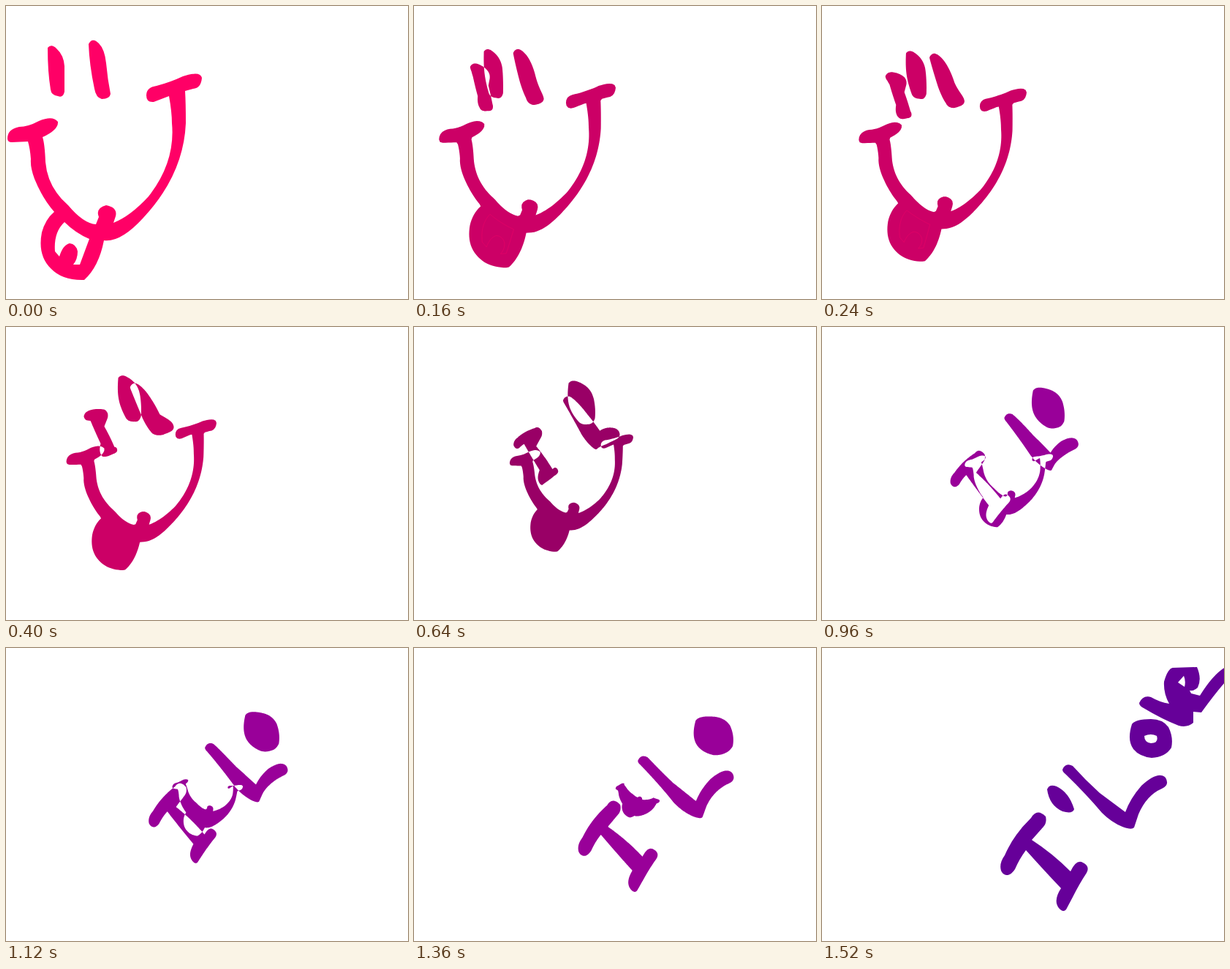
An HTML page that plays this animation: 550x400 px, repeating every 1.68 s.

```html
<!DOCTYPE html>
<html lang="en">
<head>
<meta charset="utf-8">
<title>Smile into letters</title>
<style>
  html, body { margin: 0; width: 550px; height: 400px; overflow: hidden; background: #fff; }
  svg { display: block; }
</style>
</head>
<body>
<svg width="550" height="400" viewBox="0 0 550 400">
  <path id="ink" fill-rule="evenodd"/>
  <path id="seam" fill="none" stroke="#f06" stroke-width=".7" stroke-opacity=".55"/>
</svg>
<script>
const STEP = 80, LAST = 19, LOOP = 1680, SAMPLES = 300;
const ink = document.getElementById('ink');
const seam = document.getElementById('seam');

// Smile: every outline runs clockwise from its upper left end.
const leftEye = 'M57 57Q62 51 69 58Q79 67 80 82V117Q78 126 71 123Q62 122 61 114Q57 90 57 57Z';
const rightEye = 'M113 52Q118 42 127 51Q135 59 137 78Q139 100 143 120Q142 127 131 127Q123 125 121 113Q114 80 113 52Z';
const mouth = `M2 181Q2 168 18 165Q30 165 45 157Q64 149 71 158Q72 169 50 179
  Q53 188 54 213Q57 248 85 272Q106 297 123 298L127 288Q122 276 137 272Q153 275 150 287
  L147 296Q170 287 195 260Q232 213 227 160Q227 145 223 123L202 131Q192 132 192 122
  Q192 111 206 109Q225 104 242 96Q266 88 268 98Q267 112 256 113L245 116
  Q246 132 246 160Q243 230 188 289Q157 323 134 320Q127 356 107 374
  Q77 375 61 358Q43 340 49 309Q54 291 66 281Q50 263 39 236Q33 220 34 209Q33 195 30 185L8 186Q2 186 2 181Z`;
const tongueHole = 'M80 295Q95 310 114 318L101 353H92Q98 346 98 335Q96 325 87 324Q78 326 73 342L67 335Q65 309 80 295Z';

// Lettering
const letterI = `M245 304Q242 294 250 283Q262 255 286 232Q294 218 306 230Q308 238 303 244L287 262
  Q315 280 340 305Q348 288 357 293Q367 298 362 307Q352 322 342 342L334 357Q330 362 324 355
  Q316 345 327 328Q305 305 279 276Q270 288 264 302Q258 311 252 310Q247 309 245 304Z`;
const apostrophe = 'M308 193Q311 185 321 189Q338 197 345 220Q343 227 329 223Q311 215 308 193Z';
const letterL = `M329 166Q333 156 343 161Q360 180 380 198L415 224Q422 205 437 188Q460 167 470 177
  Q476 187 465 192Q444 201 433 227L427 245Q424 249 411 244Q396 238 383 225Q362 200 333 172Q329 169 329 166Z`;
const letterO = 'M424 104Q429 97 450 97Q466 97 474 108Q481 122 478 136Q470 149 451 150Q434 148 426 138Q417 126 424 104Z';
const letterOHole = 'M441 120Q450 116 458 120Q461 130 450 130Q441 129 441 120Z';
const lettersVE = `M434 75Q439 64 450 67Q462 74 475 76Q467 62 468 46Q473 28 480 27L513 26Q520 42 514 54
  Q509 59 503 58L505 62L517 65Q535 36 552 26V46Q538 62 519 88L508 87V102Q500 109 488 106Q465 97 440 82Q434 79 434 75Z
  M487 47L495 38Q498 45 496 53Z`;

const lerp = (a, b, p) => a + (b - a) * p;

// Points at equal distances along an outline.
function sample(d) {
  const path = document.createElementNS('http://www.w3.org/2000/svg', 'path');
  path.setAttribute('d', d);
  const length = path.getTotalLength();
  return Array.from({ length: SAMPLES }, (_, i) => path.getPointAtLength(length * i / SAMPLES));
}

// Blends two outlines, pairing points by their share of the length.
function morph(from, to) {
  const start = sample(from), end = sample(to);
  return p => 'M' + start.map((a, i) =>
    `${lerp(a.x, end[i].x, p).toFixed(2)} ${lerp(a.y, end[i].y, p).toFixed(2)}`).join('L') + 'Z';
}

const eyeToI = morph(leftEye, letterI);
const eyeToO = morph(leftEye, letterO);
const eyeToL = morph(rightEye, letterL);
const mouthToApostrophe = morph(mouth, apostrophe);
const holeToApostrophe = morph(tongueHole, apostrophe);

function colour(step) {
  if (step === 0) return '#ff0066';
  if (step < 7) return '#cc0066';
  if (step < 10) return '#990066';
  return step < LAST ? '#990099' : '#660099';
}

// Holes and extra letters exist only at the two ends of the morph.
function outline(step) {
  if (step === 0) return leftEye + rightEye + mouth + tongueHole;
  if (step === LAST) return letterI + apostrophe + letterL + letterO + letterOHole + lettersVE;
  return [eyeToI, eyeToO, eyeToL, mouthToApostrophe].map(shape => shape(step / LAST)).join('');
}

let shown = -1;
function draw(now) {
  const step = Math.min(LAST, Math.floor(now % LOOP / STEP));
  if (step !== shown) {
    shown = step;
    ink.setAttribute('d', outline(step));
    ink.setAttribute('fill', colour(step));
    // A thin seam marks where the tongue has just closed.
    seam.setAttribute('d', step > 0 && step < 5 ? holeToApostrophe(step / LAST) : '');
  }
  requestAnimationFrame(draw);
}
requestAnimationFrame(draw);
</script>
</body>
</html>
```
